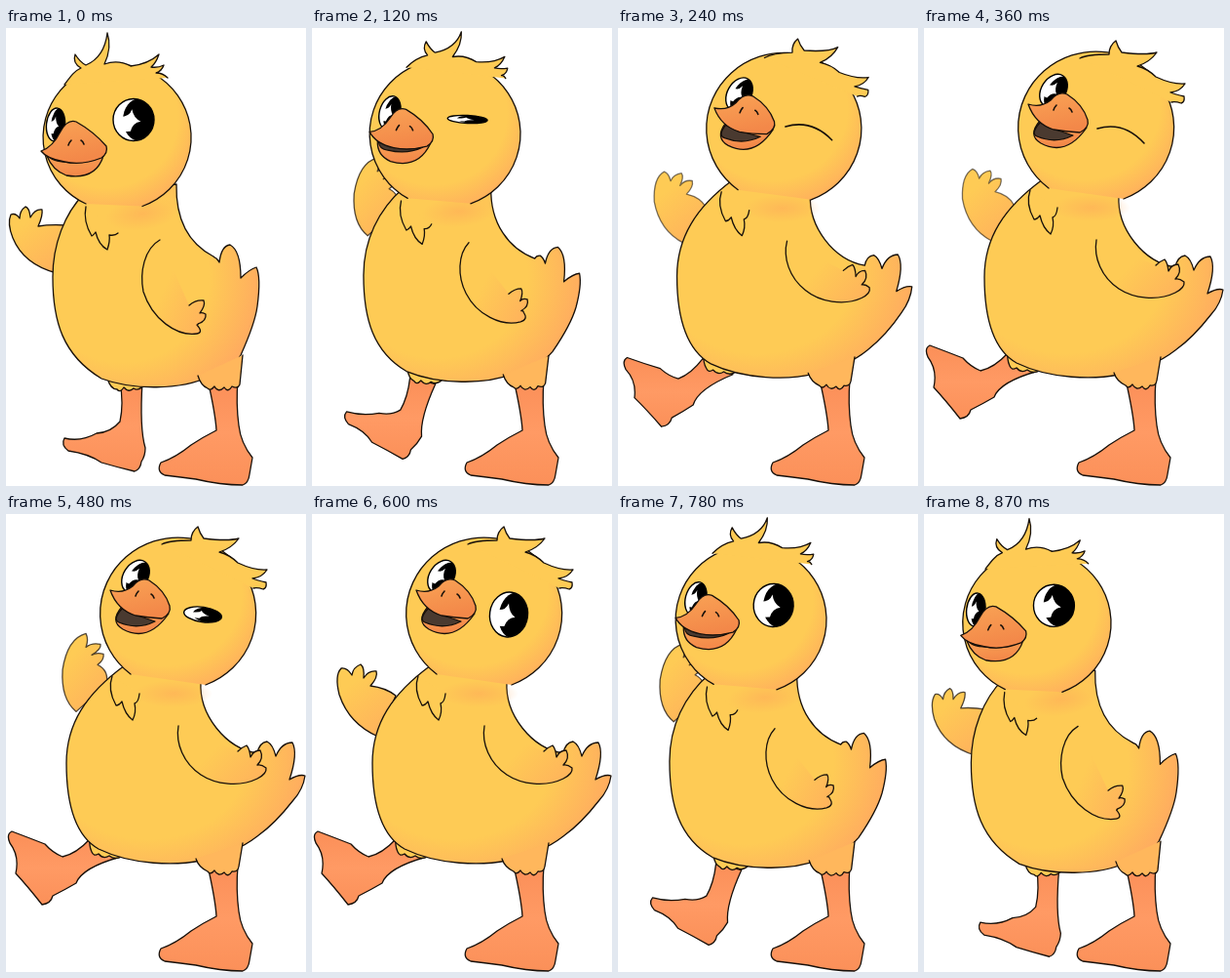
These frames come from a looping animation (308x469 px, 0.9 s). An HTML page:

```html
<!DOCTYPE html>
<html lang="en">
<head>
<meta charset="utf-8">
<title>Waving duckling</title>
<style>
html, body { margin: 0; width: 100%; height: 100%; overflow: hidden; background: #fff; }
svg { display: block; width: 100%; height: 100%; }
path { stroke: #17100a; stroke-width: 1.3; stroke-linejoin: round; stroke-linecap: round; }
.line { fill: none; stroke-width: 1.6; }
.eye * { stroke: none; }
.eye .rim { fill: none; stroke: #000; stroke-width: 1.4; vector-effect: non-scaling-stroke; }
</style>
</head>
<body>
<svg viewBox="0 0 308 469">
  <defs>
    <radialGradient id="headFill" cx=".42" cy=".38" r=".68">
      <stop offset=".72" stop-color="#fecb55"/><stop offset="1" stop-color="#ffb05c"/>
    </radialGradient>
    <radialGradient id="bodyFill" cx=".34" cy=".46" r=".72">
      <stop offset=".58" stop-color="#fecb55"/><stop offset="1" stop-color="#ffa661"/>
    </radialGradient>
    <linearGradient id="wingFill" x1=".1" y1=".2" x2="1" y2=".8">
      <stop offset=".35" stop-color="#fecb55"/><stop offset="1" stop-color="#ffb45b"/>
    </linearGradient>
    <linearGradient id="armFill" x1="0" y1="0" x2=".6" y2="1">
      <stop offset=".3" stop-color="#fecb55"/><stop offset="1" stop-color="#ffb45b"/>
    </linearGradient>
    <linearGradient id="legFill" x1="0" y1="0" x2="0" y2="1">
      <stop offset="0" stop-color="#fb8f58"/><stop offset=".5" stop-color="#ff9a64"/><stop offset="1" stop-color="#fb9059"/>
    </linearGradient>
    <linearGradient id="billFill" x1="0" y1="0" x2=".3" y2="1">
      <stop offset="0" stop-color="#f9a355"/><stop offset="1" stop-color="#f38849"/>
    </linearGradient>
    <radialGradient id="shade">
      <stop offset="0" stop-color="#ffac58" stop-opacity=".6"/><stop offset="1" stop-color="#ffac58" stop-opacity="0"/>
    </radialGradient>
    <clipPath id="disc"><circle r="1"/></clipPath>
    <g id="eye" class="eye">
      <g clip-path="url(#disc)">
        <circle r="1" fill="#fff"/>
        <ellipse cx=".3" rx=".82" ry="1.02" fill="#000"/>
        <path d="M-.8-.15Q-.2-.1-.08-.5Q0-.08.35.08Q-.05.14-.15.55L-.8.6Z" fill="#fff"/>
      </g>
      <circle class="rim" r="1"/>
    </g>
  </defs>
  <g id="stage"></g>
</svg>
<script>
const NS = "http://www.w3.org/2000/svg";
const stage = document.getElementById("stage");
const YELLOW = "#fecb55";
const NUM = /-?\d+(\.\d+)?/g;

function add(tag, attrs) {
  const el = document.createElementNS(NS, tag);
  for (const name in attrs) el.setAttribute(name, attrs[name]);
  return stage.appendChild(el);
}

// Blend the numbers of two equally built strings; (bx, by) bends the way between.
function mix(a, b, k, bx = 0, by = 0) {
  const end = b.match(NUM), bend = 4 * k * (1 - k);
  let i = 0;
  return a.replace(NUM, n => {
    const v = +n + (end[i] - n) * k + bend * (i % 2 ? by : bx);
    i++;
    return Math.round(v * 100) / 100; // keeps arc flags as plain 0 and 1
  });
}

const parts = [];
function shape(fill, stand, lean, bx, by) {
  const el = add("path", fill ? { fill } : { class: "line" });
  parts.push(k => el.setAttribute("d", mix(stand, lean, k, bx, by)));
  return el;
}
function placed(tag, attrs, stand, lean) {
  const el = add(tag, attrs);
  parts.push(k => el.setAttribute("transform", mix(stand, lean, k)));
  return el;
}

// waving wing: lowered while standing, lowered while leaning, raised
const armStand = "M62 202Q45 201 33 203Q38 192 37 186Q30 185 25 194Q24 184 20 183Q14 187 14 195Q10 189 5 191Q1 200 7 215Q18 242 52 251Z";
const armLean = "M86 186Q76 178 60 176Q68 167 66 161Q58 160 53 168Q54 157 50 154Q42 157 41 165Q36 157 30 158Q23 165 28 185Q38 215 68 228Z";
const armUp = "M95 180Q98 166 86 160Q93 155 92 149Q85 147 80 150Q90 144 89 139Q80 137 74 142Q77 134 74 128Q55 133 50 165Q48 195 64 208Z";
const arm = add("path", { fill: "url(#armFill)" });

// legs
const foot = "M207 360Q215 395 216 412Q202 419 190 427Q174 440 159 445Q154 454 163 458Q180 460 195 462Q220 468 243 468Q249 466 250 457L253 440Q241 425 239 407Q236 385 238 360Z";
shape("url(#legFill)", foot, foot);
shape("url(#legFill)",
  "M117 362Q121 385 117 403Q108 414 93 415Q77 424 60 420Q56 427 64 433Q85 436 98 445Q115 450 132 454Q138 452 139 444Q143 438 143 430Q137 410 140 362Z",
  "M86 333Q72 348 58 351Q48 347 40 338Q22 331 6 325Q0 328 4 337Q14 350 10 368Q22 381 37 400Q46 399 48 391Q60 385 72 378Q78 362 118 351Z", -6, 7);
shape(YELLOW,
  "M104 358Q107 370 114 370Q117 374 121 368Q126 374 131 369Q137 373 145 362L140 350Z",
  "M86 330Q85 340 88 346Q90 351 95 348Q100 354 106 350Q112 355 120 350L120 340Z");

// body and tail
shape("url(#bodyFill)",
  "M80 170C60 190 48 222 48 255C48 300 58 335 98 359C130 371 180 371 208 357C225 352 235 345 241 335C250 315 256 300 258 285Q262 255 257 245Q250 247 241 256Q241 228 230 222Q221 223 219 240Q218 238 216 236Q214 235 213 234C190 222 174 200 175 160Z",
  "M122 155C82 184 62 215 62 255C62 300 72 330 95 343C130 360 175 360 200 355C225 350 245 340 258 330C275 318 288 302 295 293Q305 282 307 268Q301 266 291 272Q300 245 294 234Q283 234 277 248Q274 236 268 233Q260 234 258 245C225 240 198 205 200 172Z", 0, -2);
shape("#ffb75c",
  "M197 356Q200 366 207 369Q210 372 214 367Q218 374 224 368Q228 374 232 367Q238 370 240 365L243 335",
  "M195 353Q198 362 207 366Q210 370 214 365Q218 372 224 367Q228 373 232 366Q238 367 239 361L243 337");
placed("circle", { r: 1, fill: "url(#shade)" },
  "translate(140 190) rotate(-8) scale(38 17)", "translate(172 184) rotate(0) scale(40 14)");

// folded wing
shape("url(#wingFill)",
  "M158 217C142 226 137 250 141 270C150 298 175 316 196 313Q203 312 196 304Q198 303 197 303Q206 300 205 293Q201 291 199 292Q205 284 203 279Q195 278 188 284",
  "M177 217C174 235 182 255 200 267C215 277 240 280 258 271Q268 266 267 260Q262 256 258 257Q265 250 261 242Q254 242 251 249Q250 240 247 237Q242 239 238 243", -4, 3);

// head, hair and chin
shape("url(#headFill)",
  "M82 180A76 75 0 1 1 140 182.5",
  "M128 164A80 78 0 1 1 205 175");
shape(YELLOW,
  "M82 183Q79 198 88 213Q90 212 92 209Q95 222 104 227Q107 218 106 212Q112 213 115 210",
  "M109 166Q104 180 113 196Q116 196 119 192Q122 205 130 211Q134 203 132 194Q136 193 137 184");
shape(YELLOW,
  "M60 58C66 50 70 44 77 41Q68 36 71 27Q76 35 82 38Q101 30 104 5Q109 20 101 37Q115 32 128 39Q146 37 157 27Q154 36 149 40Q156 41 162 38Q160 44 154 46Q161 46 166 51Q160 51 155 53L165 64",
  "M160 31C166 28 178 27 190 27Q190 18 197 13Q199 20 203 25Q228 28 239 25Q232 35 219 39Q230 42 238 50Q255 58 268 57Q263 65 253 66Q258 68 267 70Q268 76 264 77Q258 75 254 76L254 92", 2, -9);

// eyes
placed("use", { href: "#eye" },
  "translate(51 99) rotate(6) scale(9.5 17)", "translate(133 64) rotate(32) scale(12.5 18)");
const eye = add("use", { href: "#eye" });
const lid = shape("", "M109 95Q132 88 154 97", "M178 103Q205 95 226 118", 3, -3);

// bill
shape("url(#billFill)",
  "M42 131Q48 146 62 151Q92 156 100 131Z",
  "M119 95Q106 110 120 118Q146 132 167 102Z", -2, -3);
shape("#4a3a30",
  "M44 132Q50 137 60 137Q80 140 95 133Q78 141 44 132Z",
  "M119 97Q109 108 116 111Q135 119 153 110Q136 105 119 97Z", -2, -3);
shape("url(#billFill)",
  "M36 126Q48 122 56 106Q63 93 72 96Q90 106 103 121Q105 128 98 133Q78 141 60 137Q42 134 36 126Z",
  "M107 78Q120 82 130 74Q138 64 147 68Q163 78 168 94Q170 102 160 107Q145 106 133 104Q114 98 107 78Z", -2, -3);
shape("",
  "M64 120Q65 117 67 115M77 115Q79 116 80 119",
  "M133 84Q134 81 136 79M149 82Q151 83 152 86", -2, -3);

const clamp = v => Math.min(1, Math.max(0, v));
const ease = v => v * v * (3 - 2 * v);

function draw(t) {
  const k = ease(clamp(Math.min(t, 900 - t) / 300));
  parts.forEach(set => set(k));

  // three waves per loop
  const turn = t / 300 * 2 * Math.PI;
  const lift = (1 - Math.cos(turn)) / 1.81;
  const rest = mix(armStand, armLean, k);
  const raised = armUp.replace(/(\d+) (\d+)/g, (m, x, y) =>
    `${+x + 23 * (k - .648)} ${+y - 16 * (k - .648)}`);
  arm.setAttribute("d", mix(rest, raised, lift));
  arm.setAttribute("stroke-opacity", 1 - .45 * Math.abs(Math.sin(turn)));

  // wink
  const open = Math.max(clamp(1 - (t - 30) / 110), clamp((t - 450) / 90));
  const at = mix("131 94", "202 103", k, 4, -4);
  const [sx, sy] = mix("21 21.5", "19.5 23", k).split(" ");
  eye.setAttribute("transform", `translate(${at}) rotate(${8 * k}) scale(${sx} ${sy * Math.max(open, .01)})`);
  eye.style.display = open > .05 ? "" : "none";
  lid.style.display = open <= .05 ? "" : "none";
}

function tick(now) {
  draw(Math.floor(now % 900 / 30) * 30);
  requestAnimationFrame(tick);
}
draw(0);
requestAnimationFrame(tick);
</script>
</body>
</html>
```
